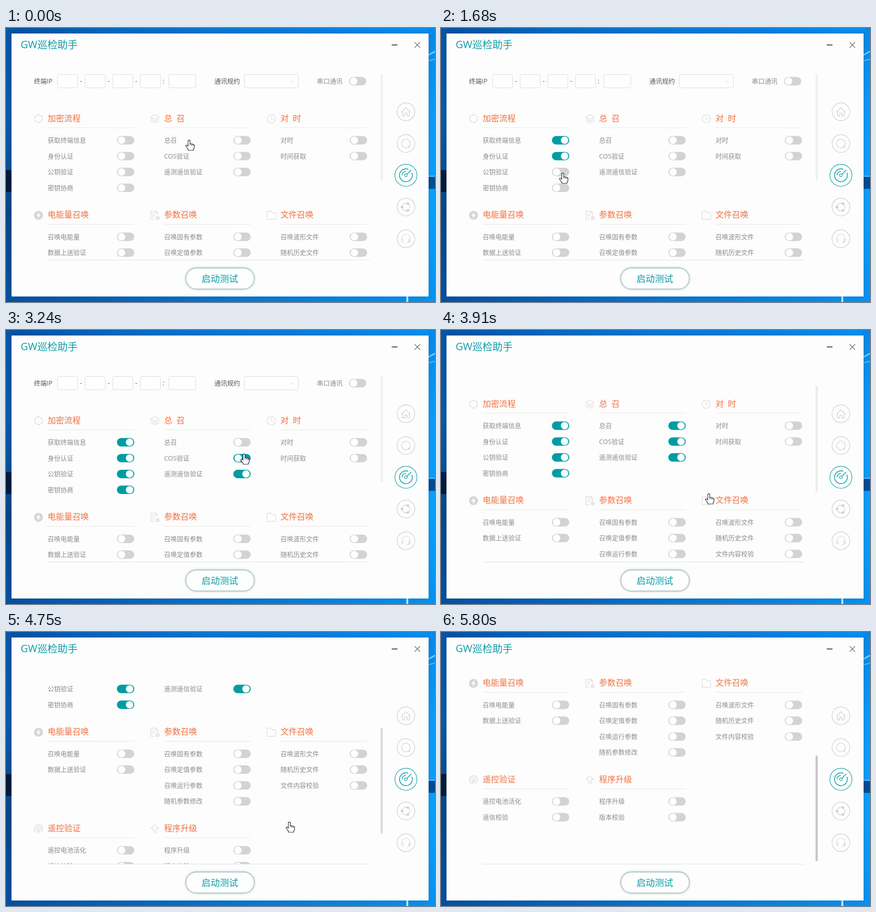
An HTML page that plays this animation: 937x598 px, repeating every 6.03 s.

```html
<!DOCTYPE html>
<html lang="zh">
<head>
<meta charset="utf-8">
<style>
html, body { margin: 0; width: 100%; height: 100%; overflow: hidden; background: #0078d7; }
svg { display: block; width: 937px; height: 598px; }
text { font-family: "Open Sans", "Noto Sans CJK SC", "Noto Sans CJK", sans-serif; font-size: 14px; font-weight: 400; fill: #8c8c8c; }
.title { font-size: 22px; fill: #0a9da6; }
.head { font-size: 18px; font-weight: 300; fill: #f0703f; }
.label { fill: #585858; }
.start { font-size: 20px; fill: #0a9da6; }
.icon { fill: none; stroke: #dadada; stroke-width: 1.2; }
.side { fill: none; stroke: #cbcbcb; stroke-width: 1.2; }
.active { stroke: #0a9da6; }
.field { fill: #fefefe; stroke: #d9d9d9; }
.rule { stroke: #e4e4e4; }
.track { fill: #d3d3d3; }
.knob { fill: #fefefe; }
.track, .knob, #page, #thumb, #hand {
  animation-duration: 6030ms; animation-iteration-count: infinite; animation-timing-function: ease-in-out;
}
</style>
</head>
<body>
<svg id="stage" viewBox="0 0 937 598" xmlns="http://www.w3.org/2000/svg"></svg>
<script>
const LOOP = 6030, DX = 254.3, DY = 210.7, STEP = 34.6;
const css = [];

// Builds a keyframe rule from rows of [time, ...values].
function keyframes(name, rows, style) {
  const all = [[0, ...rows[0].slice(1)], ...rows, [LOOP, ...rows[rows.length - 1].slice(1)]];
  const steps = all.map(([t, ...v]) => `${(t / LOOP * 100).toFixed(3)}% { ${style(...v)} }`);
  css.push(`@keyframes ${name} { ${steps.join(' ')} }`);
}

const text = (x, y, s, cls = '') => `<text x="${x}" y="${y}" class="${cls}">${s}</text>`;
const path = (d, extra = '') => `<path d="${d}" ${extra}/>`;
const ring = (r, extra = '') => `<circle r="${r}" ${extra}/>`;
const at = (x, y, body, cls = '') => `<g transform="translate(${x} ${y})" class="${cls}">${body}</g>`;
const box = (x, y, w, h, extra = '') => `<rect x="${x}" y="${y}" width="${w}" height="${h}" ${extra}/>`;
const repeat = (n, draw) => Array.from({ length: n }, (_, i) => draw(i)).join('');

// The pointer's stops: arrival, departure, place and the item it switches on.
const route = [
  [0, 50, 400, 245],
  [560, 900, 262, 247, '获取终端信息'],
  [1400, 1490, 266, 284, '身份认证'],
  [1680, 1910, 266, 317, '公钥验证'],
  [2150, 2290, 266, 354, '密钥协商'],
  [2440, 2820, 520, 320, '遥测遥信验证'],
  [3060, 3270, 520, 271, 'COS验证'],
  [3430, 3530, 520, 246, '总召'],
  [3790, 3800, 584, 356],
  [4750, 5340, 619, 415],
  [5790, LOOP, 880, 600]
];
const clicks = new Map(route.map(([, leave, , , label]) => [label, leave - 50]));
keyframes('point', route.flatMap(([arrive, leave, x, y]) => [[arrive, x, y], [leave, x, y]]),
  (x, y) => `transform: translate(${x}px, ${y}px)`);

// Each wheel notch scrolls by the same distance until the end of the page.
const MAX = 296.7, NOTCH = 95;
const scroll = [3840, 4430, 5080, 5250].flatMap((t, i) =>
  [[t, i], [t + 165, i + 1]].map(([time, n]) => [time, Math.min(n * NOTCH, MAX), 240 - 10 * n]));
keyframes('scroll', scroll, y => `transform: translateY(${-y}px)`);
keyframes('thumb', scroll, (y, c) => `transform: translateY(${y / MAX * 168}px); fill: rgb(${c}, ${c}, ${c})`);

function toggle(x, y, on) {
  let fill = '', slide = '';
  if (on) {
    keyframes(`fill${on}`, [[on, '#d3d3d3'], [on + 5, '#009ca3']], c => `fill: ${c}`);
    keyframes(`slide${on}`, [[on, 0], [on + 220, 17.5]], d => `transform: translateX(${d}px)`);
    fill = `style="animation-name: fill${on}"`;
    slide = `style="animation-name: slide${on}"`;
  }
  return at(x, y, box(0, -9.2, 38, 18.4, `rx="9.2" class="track" ${fill}`) +
    `<circle cx="10.2" r="8.1" class="knob" ${slide}/>`);
}

const icons = {
  ring: ring(8.6, 'stroke-width="1.6" stroke-dasharray="7.4 1.6"'),
  layers: path('M0-9L9.5-4L0 1L-9.5-4ZM-9.5 0L0 5L9.5 0M-9.5 4L0 9L9.5 4'),
  clock: ring(9.2) + path('M0-5V1H5'),
  bolt: ring(9.8, 'fill="#d6d6d6" stroke="none"') + path('M2-7L-5 1H-1L-2 7L5-1H1Z', 'fill="#fefefe" stroke="none"'),
  params: path('M-1 9H-9V-9H2L6-5V0M2-9V-5H6M-6-4H0M-6 0H1M-6 4H-2') +
    at(6, 6, ring(3.6, 'stroke-width="2" stroke-dasharray="1.9 .9"') + ring(1.6)),
  folder: path('M-9.5 9V-7.5Q-9.5-9-8-9H-1L1.5-5.5H8Q9.5-5.5 9.5-4V7.5Q9.5 9 8 9Z'),
  antenna: path('M-5.5 7.5A9.3 9.3 0 1 1 5.5 7.5M-3.5 4.5A5.8 5.8 0 1 1 3.5 4.5M0 1L-3.5 9.5M0 1L3.5 9.5M-2 6H2') + ring(2),
  up: path('M0-9L8.5-1H3.5V5H-3.5V-1H-8.5ZM-3.5 8.5H3.5')
};

// Icon, heading and items, three sections to a row.
const sections = [
  ['ring', '加密流程', '获取终端信息', '身份认证', '公钥验证', '密钥协商'],
  ['layers', '总\u2002召', '总召', 'COS验证', '遥测遥信验证'],
  ['clock', '对\u2002时', '对时', '时间获取'],
  ['bolt', '电能量召唤', '召唤电能量', '数据上送验证'],
  ['params', '参数召唤', '召唤固有参数', '召唤定值参数', '召唤运行参数', '随机参数修改'],
  ['folder', '文件召唤', '召唤波形文件', '随机历史文件', '文件内容校验'],
  ['antenna', '遥控验证', '遥控电池活化', '遥信校验'],
  ['up', '程序升级', '程序升级', '版本校验']
];

function section([icon, name, ...items], n) {
  const list = items.map((label, i) => {
    const y = 245 + STEP * i;
    return text(91, y + 5, label) + toggle(242.2, y, clicks.get(label));
  });
  return at(n % 3 * DX, Math.floor(n / 3) * DY,
    at(71, 198, icons[icon], 'icon') + text(91, 203.5, name, 'head') +
    path('M91 217.8H280', 'class="rule"') + list.join(''));
}

const field = (x, w) => box(x + .5, 101.5, w, 29, 'rx="3" class="field"');
const form = text(61, 120.7, '终端IP', 'label') +
  repeat(4, i => field(112 + 60.3 * i, 44)) + field(355, 59) +
  repeat(3, i => text(161.5 + 60.4 * i, 121, '-', 'label')) + text(342, 120.5, ':', 'label') +
  text(455, 120.7, '通讯规约', 'label') + field(520, 118) +
  path('M622 115.5L625 118.5L628 115.5', 'fill="none" stroke="#ccc"') +
  text(679, 120.7, '串口通讯') + toggle(749, 116);

const dot = angle => `<circle cx="8.6" r="2.6" fill="#cbcbcb" stroke="none" transform="rotate(${angle})"/>`;
const sidebar = [
  path('M-10 1L0-9L10 1M-7.5-1V9H-2.5V3H2.5V9H7.5V-1'),
  ring(9.6) + path('M4.5 5.5L9 9.5'),
  ring(14, 'stroke-width="1.6" stroke-dasharray="76 12" transform="rotate(-22)"') +
    path('M-8.5 0A8.5 8.5 0 0 1 0-8.5M2.2-2.2L11.5-11.5', 'stroke-width="1.5"') + ring(3),
  ring(8.6) + repeat(3, i => dot(60 + 120 * i)),
  path('M-9 1V-1A9 9 0 0 1 9-1V2Q9 8 2 9', 'stroke="#d6d6d6"') +
    box(-9.5, 0, 3.5, 7, 'rx="1.5" stroke="#d6d6d6"') + box(6, 0, 3.5, 7, 'rx="1.5" stroke="#d6d6d6"')
].map((art, i) => {
  const active = i === 2;
  return at(873.5, 182.8 + 69.3 * i, ring(active ? 24.1 : 19.4) + art, active ? 'side active' : 'side');
}).join('');

const gradient = (id, dir, ...colors) => `<linearGradient id="${id}" ${dir}>` +
  colors.map((c, i) => `<stop offset="${i / (colors.length - 1)}" stop-color="${c}"/>`).join('') + '</linearGradient>';
const down = 'x2="0" y2="1"';

const defs = `<defs>
  ${gradient('top', '', '#05509f', '#0668bf', '#0877d4', '#087fe0', '#0590f0')}
  ${gradient('left', down, '#0755a6', '#0859a9', '#064684', '#07509f')}
  ${gradient('right', down, '#0588e6', '#0a9bfa', '#08a0fa', '#0592f0')}
  ${gradient('bottom', '', '#07509f', '#0674cf', '#0592f0')}
  <clipPath id="view"><rect x="50" y="101" width="760" height="405"/></clipPath>
  <filter id="shade" x="-5%" y="-5%" width="110%" height="110%"><feDropShadow dx="0" dy="0" stdDeviation="3" flood-color="#002850" flood-opacity=".3"/></filter>
  <filter id="glow" x="-10%" y="-25%" width="120%" height="150%"><feDropShadow dx="0" dy="0" stdDeviation="2" flood-color="#3c6663" flood-opacity=".5"/></filter>
</defs>`;

const desktop = box(0, 0, 937, 14, 'fill="url(#top)"') + box(0, 584, 937, 14, 'fill="url(#bottom)"') +
  box(0, 0, 14, 598, 'fill="url(#left)"') + box(921, 0, 16, 598, 'fill="url(#right)"') +
  box(0, 310, 14, 48, 'fill="#001b3c"') + box(921, 325, 16, 26, 'fill="#004b92"') +
  path('M921 60L937 51', 'stroke="#7fd0ff" stroke-width="3"') +
  path('M921 72L937 68M921 323.5H937', 'stroke="#5cc0ff" stroke-width="2"') +
  path('M876.5 584V598', 'stroke="#c9eeff" stroke-width="4"');

const hand = path('M-2.3 13V1.8A2.2 2.2 0 0 1 2.1 1.8V8Q4 6.8 5.6 8.5Q7.6 7.5 8.8 9.5Q11.4 9.2 11.4 12V15Q11.4 17.5 9.4 19.5V22H-2V20Q-4.5 17-7.4 12.3Q-7.2 9.8-4.4 11Z',
  'fill="#fff" stroke="#20202c" stroke-width="1.2" stroke-linejoin="round"') +
  path('M2.1 8V11.5M5.6 8.5V12M8.8 9.5V12.5', 'stroke="#20202c"');

document.getElementById('stage').innerHTML = defs + desktop +
  box(12, 12, 911, 574, 'fill="#fdfdfd" filter="url(#shade)"') +
  text(32, 44.3, 'GW巡检助手', 'title') +
  path('M842.5 37H855', 'stroke="#777" stroke-width="3"') +
  path('M892.5 31L904.5 43M904.5 31L892.5 43', 'stroke="#777" stroke-width="1.6"') +
  `<g clip-path="url(#view)"><g id="page" style="animation-name: scroll">${form}${sections.map(section).join('')}</g></g>` +
  box(818, 102, 5, 230, 'id="thumb" style="animation-name: thumb"') +
  path('M91 506.5H794', 'stroke="#dedede"') + sidebar +
  box(393, 524, 149, 45.5, 'rx="22.7" fill="#fefefe" stroke="#a3bfbd" stroke-width="1.3" filter="url(#glow)"') +
  text(427, 555, '启动测试', 'start') +
  `<g id="hand" style="animation-name: point">${hand}</g>`;

const sheet = document.createElement('style');
sheet.textContent = css.join('\n');
document.head.append(sheet);
</script>
</body>
</html>
```
